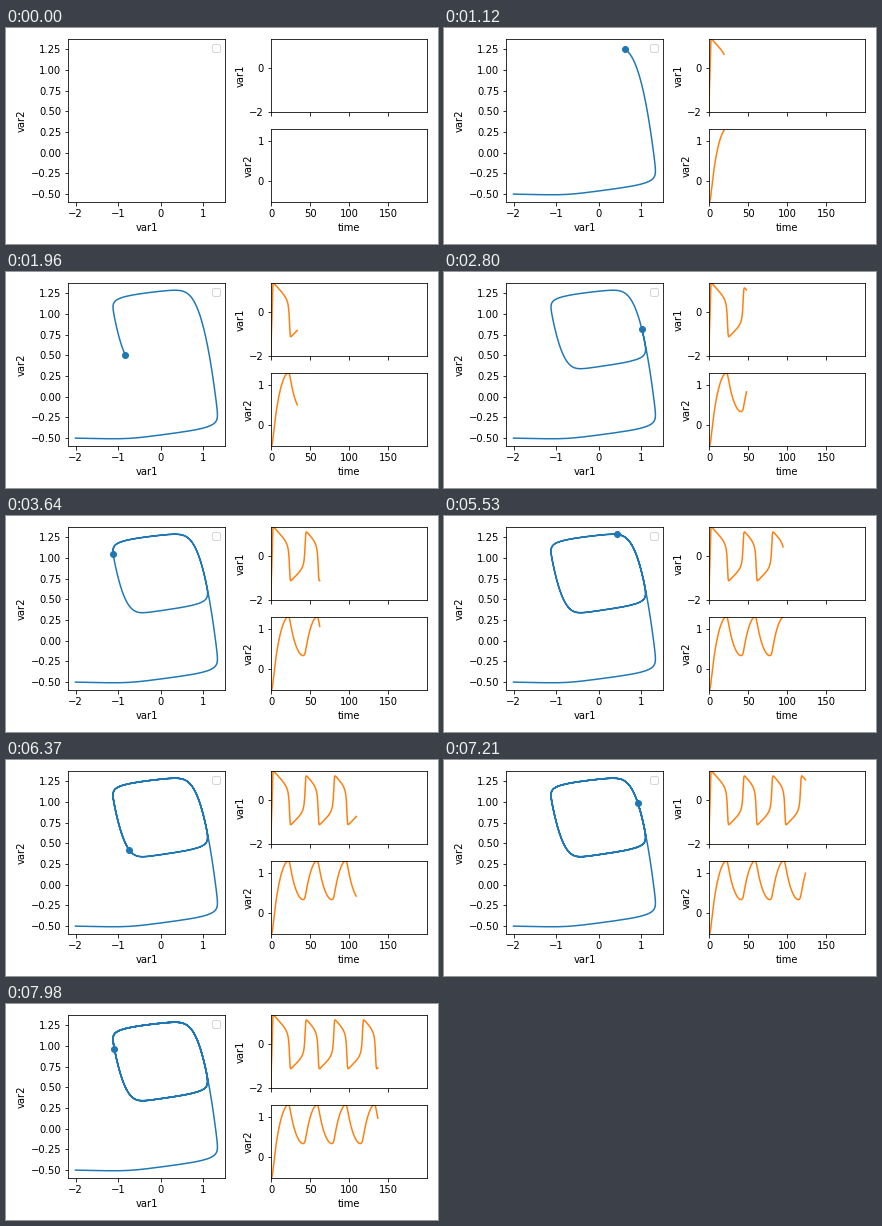
These frames come from a looping animation (432x216 px, 8000 ms). A matplotlib script:

```python
import numpy as np
import matplotlib.pyplot as plt
from matplotlib.animation import FuncAnimation

DT, T_END = 0.1, 200
A, B, TAU, I_EXT = 0.7, 0.8, 12.5, 0.8
STEP_MS = 70      # the picture advances every 70 ms
STEP_POINTS = 12  # samples added per advance
TICK_MS, LOOP_MS = 20, 8000


def slope(s):
    """FitzHugh-Nagumo oscillator."""
    x, y = s
    return np.array([x - x**3 - y + I_EXT, (x + A - B * y) / TAU])


def integrate(start):
    out = [np.array(start)]
    for _ in range(int(T_END / DT) - 1):
        s = out[-1]
        k1 = slope(s)
        k2 = slope(s + DT / 2 * k1)
        k3 = slope(s + DT / 2 * k2)
        k4 = slope(s + DT * k3)
        out.append(s + DT / 6 * (k1 + 2 * k2 + 2 * k3 + k4))
    return np.array(out).T


def limits(v, margin=0.0):
    pad = margin * np.ptp(v)
    return v.min() - pad, v.max() + pad


var1, var2 = integrate([-2.0, -0.5])
time = np.arange(len(var1)) * DT

fig = plt.figure(figsize=(6, 3), dpi=72)
grid = fig.add_gridspec(2, 2)

phase = fig.add_subplot(grid[:, 0])
phase.set(xlim=limits(var1, 0.05), ylim=limits(var2, 0.05),
          xlabel="var1", ylabel="var2")
path, = phase.plot([], [], color="C0")
dot, = phase.plot([], [], "o", color="C0")
phase.legend([], [], loc="upper right")

traces = []
for row, (name, data) in enumerate([("var1", var1), ("var2", var2)]):
    ax = fig.add_subplot(grid[row, 1])
    ax.set(xlim=limits(time), ylim=limits(data), ylabel=name)
    if row == 0:
        ax.tick_params(labelbottom=False)
    else:
        ax.set_xlabel("time")
    line, = ax.plot([], [], color="C1")
    traces.append((line, data))

fig.tight_layout()


def draw(i):
    step = (i * TICK_MS + TICK_MS // 2) // STEP_MS
    n = step * STEP_POINTS
    path.set_data(var1[:n], var2[:n])
    dot.set_data(var1[:n][-1:], var2[:n][-1:])
    for line, data in traces:
        line.set_data(time[:n], data[:n])
    return [path, dot] + [line for line, _ in traces]


anim = FuncAnimation(fig, draw, frames=LOOP_MS // TICK_MS, interval=TICK_MS,
                     init_func=lambda: draw(0), repeat=True)
plt.show()
```
